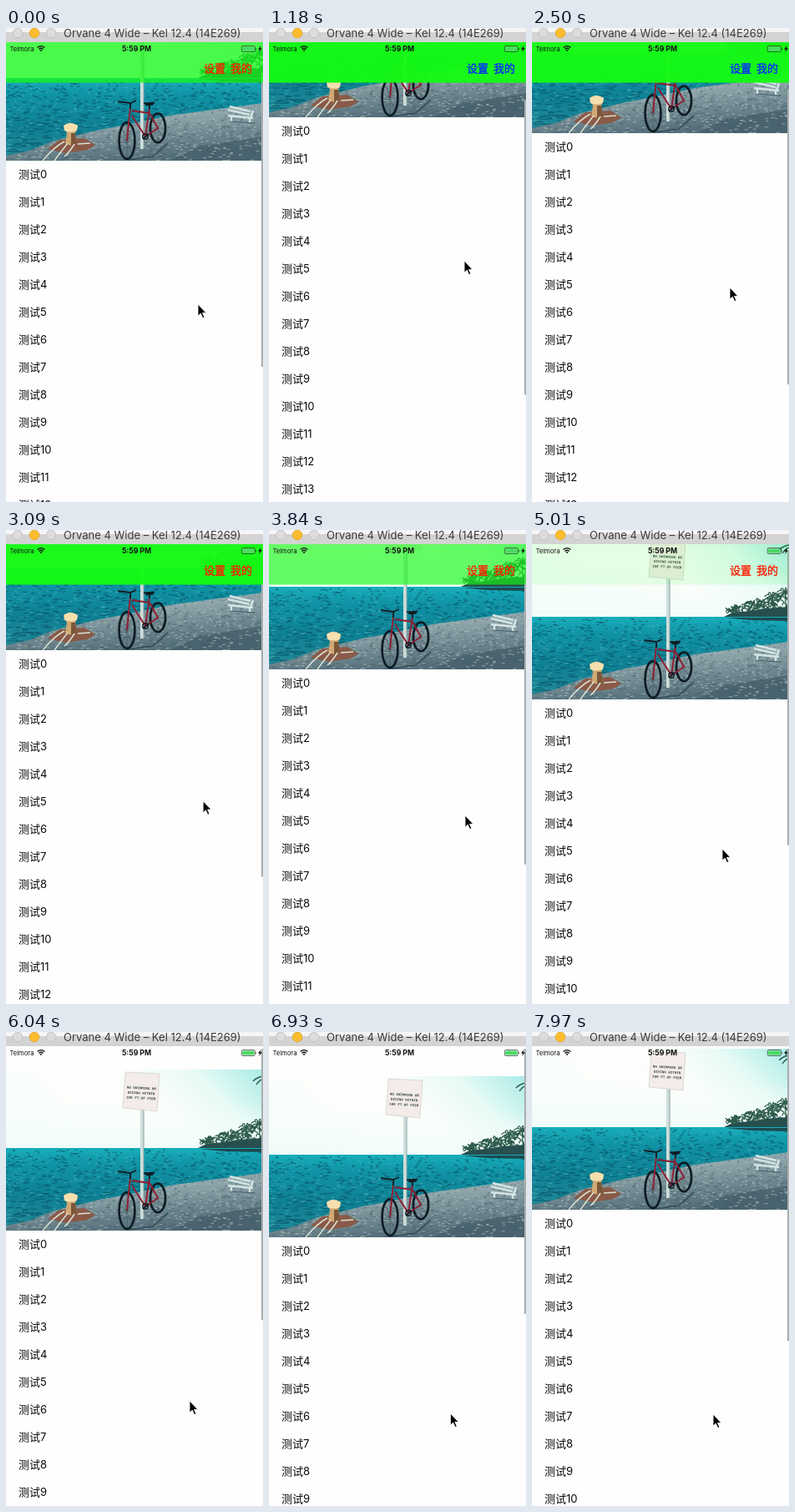
Recreate the animation shown at these times as an HTML page. Size 308x568 px, loop 8000 ms.

```html
<!DOCTYPE html>
<html lang="zh">
<head>
<meta charset="utf-8">
<title>Scroll header</title>
<style>
html, body { margin: 0; width: 100%; height: 100%; overflow: hidden; background: #fff; }
svg { display: block; width: 308px; height: 568px; font-family: Inter, "Noto Sans CJK SC", "Noto Sans CJK", sans-serif; }
</style>
</head>
<body>
<svg viewBox="0 0 308 568">
  <defs>
    <linearGradient id="sky" x1="0" y1="0.3" x2="1" y2="0">
      <stop offset="0" stop-color="#fafefa"/><stop offset=".5" stop-color="#fdfefc"/>
      <stop offset=".75" stop-color="#e6faf5"/><stop offset="1" stop-color="#a9ebe7"/>
    </linearGradient>
    <linearGradient id="haze" x1="0" y1="0" x2="0" y2="1">
      <stop offset="0" stop-color="#f4fdfa" stop-opacity="0"/><stop offset="1" stop-color="#f0fcf9"/>
    </linearGradient>
    <linearGradient id="sea" x1="0" y1="0" x2="0" y2="1">
      <stop offset="0" stop-color="#18aebb"/><stop offset=".2" stop-color="#1093a5"/>
      <stop offset=".6" stop-color="#0f8093"/><stop offset="1" stop-color="#228a97"/>
    </linearGradient>
    <linearGradient id="stone" x1="0" y1="0" x2=".35" y2="1">
      <stop offset="0" stop-color="#a3b9bb"/><stop offset=".5" stop-color="#8da4a9"/>
      <stop offset="1" stop-color="#58727c"/>
    </linearGradient>
    <clipPath id="crop"><rect width="308" height="193"/></clipPath>
    <clipPath id="pierClip"><path d="M0 187L28 181 58 169 112 156 150 149 195 139 255 131 308 124V193H0Z"/></clipPath>
  </defs>

  <rect width="308" height="568" fill="#fefefe"/>

  <g id="list">
    <g transform="translate(0 -193)" clip-path="url(#crop)">
      <rect width="308" height="94" fill="url(#sky)"/>
      <rect y="40" width="308" height="54" fill="url(#haze)"/>
      <path id="palms" fill="none" stroke="#2f5c4c" stroke-width="1.3"/>
      <path d="M228 95L240 89 262 87 280 84 308 82V98H232Z" fill="#274f4f"/>
      <rect y="94" width="308" height="99" fill="url(#sea)"/>
      <path id="dark" stroke="#075468" stroke-width="1.1" opacity=".7"/>
      <path id="light" stroke="#5cc3cb" stroke-width=".8" opacity=".65"/>
      <path d="M232 95H308V99L262 98Z" fill="#1c4a50"/>
      <g clip-path="url(#pierClip)">
        <rect y="115" width="308" height="78" fill="url(#stone)"/>
        <path d="M196 193L232 176 308 164V193Z" fill="#3c5662" opacity=".5"/>
        <path id="fleck" stroke="#435d68" stroke-width="1" opacity=".6"/>
        <path id="chip" stroke="#c6d3d1" stroke-width=".9" opacity=".65"/>
      </g>

      <path d="M50 179L64 168 94 166 107 174 98 180 72 184Z" fill="#8a5a48"/>
      <path d="M69 151Q77 145 86 151L83 160 85 173Q78 177 71 172L73 160Z" fill="#cfa873"/>
      <path d="M69 151Q77 145 86 151L85 157Q77 160 70 157Z" fill="#f5dfae"/>
      <path d="M78 160L83 160 85 173 78 175Z" fill="#7b5638"/>
      <path d="M70 170Q58 176 44 193M74 172Q66 182 58 193M82 173Q76 183 70 188M86 173L101 172" fill="none" stroke="#dbe0d2" stroke-width="1.5"/>

      <path d="M268 128L293 134M266 132L292 138M266 139L296 142M270 140V147M292 142V147M296 133L293 142" fill="none" stroke="#d3e4e3" stroke-width="2.6"/>
      <path d="M268 146L298 148" stroke="#425f69"/>

      <rect x="161" y="47" width="4" height="132" fill="#cfdedb"/>
      <path d="M165 47V179" stroke="#87a3a5"/>
      <path d="M143 3L184 5 181 50 140 46Z" fill="#f4ece8" stroke="#cfd3cd" stroke-width=".8"/>
      <g font-size="4.2" font-weight="700" fill="#344646" text-anchor="middle" font-family="'Liberation Mono', monospace" transform="rotate(3 162 29)">
        <text x="162" y="23.5">NO SWIMMING OR</text>
        <text x="162" y="29.5">DIVING WITHIN</text>
        <text x="162" y="35.5">100 FT.OF PIER</text>
      </g>

      <g fill="none" stroke="#0f1c24">
        <path d="M145 192L176 188 194 172" stroke="#39525c" stroke-width="2"/>
        <ellipse cx="145" cy="169" rx="9.4" ry="21.8" stroke-width="2.7"/>
        <ellipse cx="182" cy="154" rx="9.1" ry="17.3" stroke-width="2.7"/>
        <path d="M145 148V190M136 169H154M139 153L151 185M151 153L139 185M182 138V170M174 154H190M176 142L188 166M188 142L176 166" stroke-width=".4" opacity=".6"/>
        <path d="M149 128L145 169M151 133L172 136M151 139L167 164M172 130L167 164 182 154 172 136" stroke="#8f1e32" stroke-width="2"/>
        <path d="M134 122L149 124 156 121M149 123V131M172 126V131M164 167L171 161" stroke-width="1.8"/>
        <path d="M165 124L178 123 176 126 169 127Z" fill="#0f1c24"/>
        <circle cx="167" cy="164" r="3.2" stroke-width="1.4"/>
      </g>
    </g>
    <g id="rows" font-size="13" fill="#0a0a0a"></g>
  </g>

  <rect id="bar" x="306" width="2" rx="1" fill="#a9adad"/>
  <rect id="nav" y="17" width="308" height="48.5" fill="#14fa14"/>
  <g id="menu" font-size="13" stroke-width=".35">
    <text x="237" y="53">设置</text><text x="269" y="53">我的</text>
  </g>

  <g fill="#111">
    <text x="4.5" y="28" font-size="7.6">Telmora</text>
    <text x="156.5" y="28" font-size="8.7" font-weight="700" text-anchor="middle">5:59 PM</text>
    <path d="M37.6 23.6Q42 19.6 46.4 23.6M39.4 25.4Q42 23 44.6 25.4" fill="none" stroke="#111" stroke-width="1.3"/>
    <path d="M40.5 26.6Q42 25.4 43.5 26.6L42 28.2Z"/>
    <rect x="282.3" y="21.5" width="16" height="7" rx="1.4" fill="none" stroke="#333" stroke-width=".7"/>
    <rect x="283.2" y="22.4" width="14.2" height="5.2" rx=".6" fill="#4cd964"/>
    <path d="M299.2 23.6Q300.8 25 299.2 26.4Z"/>
    <path d="M305.6 21L302 25.6H304.2L303.2 29 307 24.2H304.8Z"/>
  </g>

  <rect width="308" height="5" fill="#f5f5f5"/>
  <rect y="5" width="308" height="12" fill="#d3d3d3"/>
  <g stroke-width=".8">
    <circle cx="14" cy="6" r="5.8" fill="#dcdcdc" stroke="#bdbdbd"/>
    <circle cx="34" cy="6" r="5.8" fill="#fdbd2f" stroke="#dfa023"/>
    <circle cx="54" cy="6" r="5.8" fill="#dcdcdc" stroke="#bdbdbd"/>
  </g>
  <text x="69" y="11" font-size="13" fill="#3a3a3a">Orvane 4 Wide – Kel 12.4 (14E269)</text>

  <path id="cursor" d="M0 0V14.2L3.3 11.2 5.7 16.6 7.9 15.6 5.5 10.4H9.9Z" fill="#000" stroke="#fff" stroke-width=".9"/>
</svg>
<script>
const LOOP = 8000, REST = 210;
const $ = id => document.getElementById(id);

// Screen refreshes: first time, last time, count; the clock counts in 10 ms
const BURSTS = [[150, 1180, 8], [1320, 1470, 2], [1910, 2950, 8], [3090, 3990, 7],
  [4140, 5160, 8], [5310, 6340, 8], [6640, 7080, 4], [7820, 7970, 2]];
const ticks = [0];
for (const [a, b, n] of BURSTS)
  for (let i = 0; i < n; i++) ticks.push(Math.floor((a + (b - a) * i / (n - 1)) / 10) * 10);

// Time, top of the list, pointer x, pointer y
const KEYS = [
  [0, 159, 230, 331], [1180, 106.5, 234, 279], [1470, 100, 235, 279],
  [1910, 101, 235, 286], [2500, 126, 237, 311], [3840, 167, 235, 342],
  [5010, 203, 228, 382], [5200, 210, 227, 391], [6040, 238, 220, 442],
  [6340, 244, 219, 453], [7080, 246, 217, 458], [7670, 246, 217, 458],
  [7820, 226, 217, 458], [7970, 213, 217, 458], [LOOP, 213, 217, 458]
];

function pose(t) {
  const i = KEYS.findIndex(k => k[0] > t), a = KEYS[i - 1], b = KEYS[i];
  const p = (t - a[0]) / (b[0] - a[0]);
  return a.slice(1).map((v, j) => v + (b[j + 1] - v) * p);
}

let seed = 7;
const rnd = (a, b) => {
  seed = (seed * 16807) % 2147483647;
  return a + (b - a) * seed / 2147483647;
};

// Short flat strokes, longer towards the bottom
function strokes(id, n, top, bottom, len) {
  let d = "";
  for (let i = 0; i < n; i++) {
    const y = rnd(top, bottom), w = len * (.4 + (y - top) / (bottom - top));
    d += `M${rnd(-5, 308).toFixed(1)} ${y.toFixed(1)}l${w.toFixed(1)} ${rnd(-.8, .8).toFixed(1)}`;
  }
  $(id).setAttribute("d", d);
}
strokes("dark", 800, 96, 190, 7);
strokes("light", 420, 96, 190, 4);
strokes("fleck", 600, 124, 193, 4);
strokes("chip", 480, 124, 193, 3);

let leaves = "";
for (let i = 0; i < 170; i++) {
  const x = rnd(234, 308), reach = 4 + (x - 234) * .3;
  leaves += `M${x.toFixed(1)} ${(88 - rnd(0, reach)).toFixed(1)}q${rnd(-5, 5).toFixed(1)} -3 ${rnd(-6, 6).toFixed(1)} 2`;
}
for (const [x, y] of [[288, 70], [303, 65]]) {
  leaves += `M${x} ${y}L${x + 2} 90`;
  for (let a = 0; a < 9; a++) {
    const c = Math.cos(a * .7) * 10, s = Math.sin(a * .7) * 6;
    leaves += `M${x} ${y}q${c * .6} ${s - 3} ${c} ${s + 2}`;
  }
}
$("palms").setAttribute("d", leaves + "M308 8Q301 9 296 14M308 11Q303 13 300 18");

$("rows").innerHTML = Array.from({length: 15}, (_, i) =>
  `<text x="15" y="${21 + i * 33}">测试${i}</text>`).join("");

function draw(now) {
  const t = now % LOOP;
  const [top, x, y] = pose(ticks.filter(v => v <= t).pop());
  const scroll = REST - top, over = Math.max(0, -scroll);
  const alpha = Math.max(0, Math.min(.97, scroll / 67));
  const start = 20 + .64 * Math.max(0, scroll);
  const ink = scroll >= 67 ? "#0026ff" : "#ff1a00";

  $("list").setAttribute("transform", `translate(0 ${Math.round(top)})`);
  $("nav").setAttribute("opacity", alpha);
  $("menu").setAttribute("fill", ink);
  $("menu").setAttribute("stroke", ink);
  $("menu").setAttribute("visibility", scroll < 0 ? "hidden" : "visible");
  $("bar").setAttribute("y", start);
  $("bar").setAttribute("height", 353.5 - over);
  $("cursor").setAttribute("transform", `translate(${x} ${y})`);
}

function loop() {
  draw(performance.now());
  requestAnimationFrame(loop);
}
loop();
</script>
</body>
</html>
```
